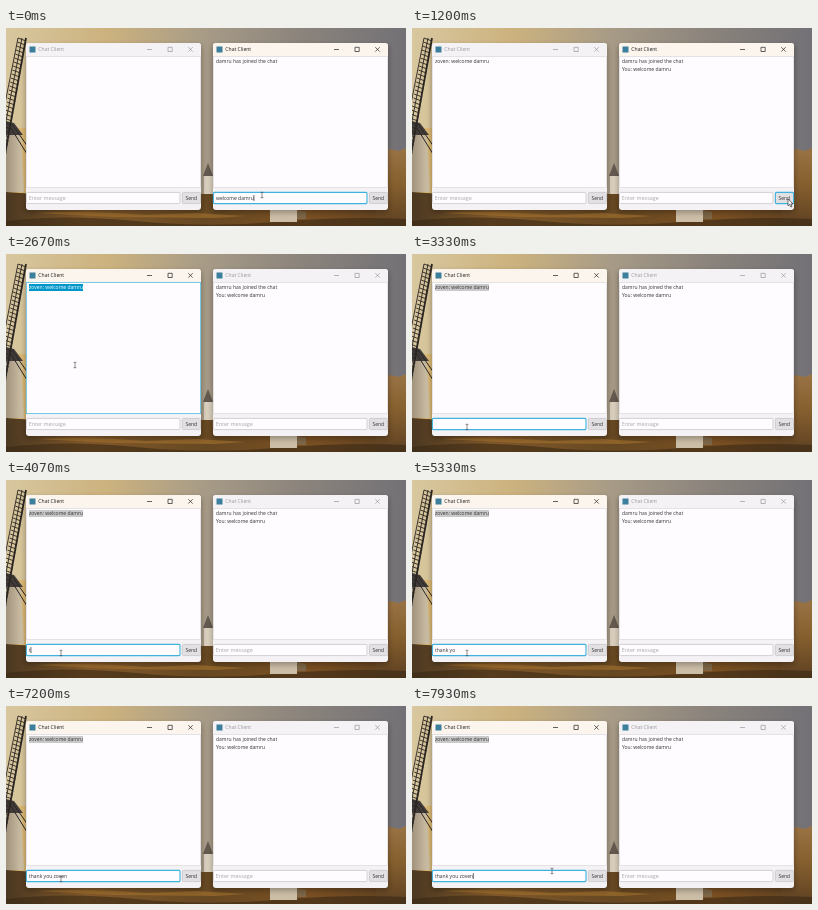
These frames come from a looping animation (400x198 px, 8000 ms). An HTML page:

```html
<!DOCTYPE html>
<html lang="en">
<head>
<meta charset="utf-8">
<title>Chat Client</title>
<style>
  html, body { margin: 0; width: 100%; height: 100%; overflow: hidden; background: #a39680; }
  svg { display: block; width: 100%; height: 100%; }
  text { font: 5px "Open Sans", "Noto Sans", sans-serif; fill: #333; white-space: pre; }
  .title { font-size: 5.1px; fill: #999; }
  .prompt { font-size: 5.4px; fill: #a8a8a8; }
  .bar { fill: #f4f2f5; }
  .controls { fill: none; stroke: #999; stroke-width: .7; }
  .active .title { fill: #1c1c1c; }
  .active .bar { fill: #fcf5ed; }
  .active .controls { stroke: #222; }
  .box { fill: #fefcfe; stroke: #c4c2c4; stroke-width: .7; }
  .area { stroke: #dcdadc; }
  .button { fill: #e2e0e2; }
  .box.focus { stroke: #3fb2de; stroke-width: 1.1; }
  .area.focus { stroke: #62c1e2; stroke-width: .9; }
  .caret { stroke: #111; stroke-width: .6; }
</style>
</head>
<body>
<svg id="stage" viewBox="0 0 400 198" preserveAspectRatio="none">
  <defs>
    <linearGradient id="sky">
      <stop stop-color="#d8c79f"/><stop offset=".25" stop-color="#ccb27e"/>
      <stop offset=".5" stop-color="#a79b87"/><stop offset=".75" stop-color="#8a837c"/>
      <stop offset="1" stop-color="#737176"/>
    </linearGradient>
    <linearGradient id="glow">
      <stop stop-color="#dcb466" stop-opacity=".8"/><stop offset="1" stop-color="#dcb466" stop-opacity="0"/>
    </linearGradient>
    <linearGradient id="land">
      <stop stop-color="#4b3821"/><stop offset=".2" stop-color="#82592a"/>
      <stop offset=".5" stop-color="#664822"/><stop offset=".75" stop-color="#7b5022"/>
      <stop offset="1" stop-color="#5d4022"/>
    </linearGradient>
    <linearGradient id="hill" x2="0" y2="1">
      <stop stop-color="#9a7345"/><stop offset=".45" stop-color="#87602f"/>
      <stop offset="1" stop-color="#5d4022"/>
    </linearGradient>
    <linearGradient id="wall">
      <stop stop-color="#a0927c"/><stop offset="1" stop-color="#d3c5aa"/>
    </linearGradient>
    <filter id="soft" x="-10%" y="-10%" width="120%" height="120%">
      <feGaussianBlur stdDeviation="2.5"/>
    </filter>
  </defs>
  <rect width="400" height="198" fill="url(#sky)"/>
  <rect y="100" width="180" height="70" fill="url(#glow)"/>
  <path d="M0 164L60 168 130 160 195 166 300 166 400 160V198H0Z" fill="url(#land)"/>
  <path d="M370 128L384 121 393 123 400 120V198H370Z" fill="url(#hill)"/>
  <path d="M0 193Q60 186 130 193T270 194 400 191V198H0Z" fill="#3a2914" opacity=".6"/>
  <path d="M30 185Q80 182 140 187L190 185 240 188 210 190 110 189Z" fill="#a87630" opacity=".6"/>
  <path d="M0 106H15L18 164H0Z" fill="url(#wall)"/>
  <path d="M0 93L8 95 17 107H0Z" fill="#413c3a"/>
  <path d="M198 147H207V166H198Z" fill="#dacfbd"/>
  <path d="M197 148L202 135 207 148Z" fill="#655a50"/>
  <path d="M264 178H291V194H264Z" fill="#cbbda6"/>
  <path d="M291 182L300 184V191H291Z" fill="#7d6647"/>
  <g id="sail" fill="none" stroke="#2b2622"/>
  <g id="windows"/>
  <g id="pointer">
    <path id="beam" d="M-1.4-2.7H1.4M-1.4 2.7H1.4M0-2.7V2.7" fill="none" stroke="#444" stroke-width=".6"/>
    <path id="arrow" d="M0 0V6.8L1.6 5.3 2.8 8 4 7.5 2.9 4.9H5Z" fill="#fff" stroke="#111" stroke-width=".6"/>
  </g>
</svg>
<script>
const LOOP = 8000;
const SENT = 900, SWITCHED = 2200, FIELD_FOCUS = 3300;
const GUEST = "damru", HOST = "zoven";
const greeting = `welcome ${GUEST}`;
const reply = `thank you ${HOST}`;
const keyTimes = [3950, 4260, 4430, 4610, 4790, 4960, 5120, 5270, 5560, 5790, 6060, 6310, 6560, 6780, 7000];
const path = [
  [0, 256, 167], [150, 256, 167], [800, 376, 171], [1350, 376, 171],
  [2050, 84, 72], [2500, 69, 111], [2720, 69, 111], [3250, 55, 173],
  [7300, 55, 173], [7900, 140, 165], [LOOP, 140, 165]
];
const $ = id => document.getElementById(id);

function drawSail() {
  let rungs = "";
  for (let i = 0; i <= 30; i++) {
    const x = 19 - i * .7, y = 11 + i * 4;
    rungs += `M${x - 7} ${y - 1}L${x + 1} ${y + 2}`;
  }
  $("sail").innerHTML = `
    <path d="M20 10L-2 132" stroke-width="1.8"/>
    <path d="M12 10L-9 116M16 10L-6 124" stroke-width=".9"/>
    <path d="${rungs}" stroke-width=".9"/>
    <path d="M3 97L21 126M6 96L22 119" stroke-width="1"/>`;
}

function makeWindow(x) {
  const g = document.createElementNS("http://www.w3.org/2000/svg", "g");
  g.setAttribute("transform", `translate(${x})`);
  g.innerHTML = `
    <rect x="19" y="17" width="177" height="168" rx="4" opacity=".25" filter="url(#soft)"/>
    <rect x="20" y="15" width="175" height="167" rx="3" fill="#f4f2f4"/>
    <path class="bar" d="M20 28V18Q20 15 23 15H192Q195 15 195 18V28Z"/>
    <rect x="23.5" y="18.5" width="6" height="6" fill="#3c7f9c"/>
    <text class="title" x="32.3" y="23.3">Chat Client</text>
    <path class="controls" d="M141 21.5H146M162 19.3H166.2V23.5H162ZM182.3 19.2L186.7 23.6M186.7 19.2L182.3 23.6"/>
    <rect class="box area" x="20.4" y="28.4" width="174.2" height="131.2"/>
    <rect class="mark" x="23" y="30" height="7"/>
    <text class="line1" x="23" y="35.4"/><text class="line2" x="23" y="43.4"/>
    <rect class="box field" x="20.4" y="164.4" width="153.6" height="11.2" rx="1"/>
    <text class="prompt" x="22.7" y="172">Enter message</text>
    <text class="typed" x="23" y="171.9"/>
    <path class="caret" d="M0 167V173"/>
    <rect class="box button" x="176.4" y="164.4" width="18.2" height="11.2" rx="1"/>
    <text x="179.4" y="171.9">Send</text>`;
  $("windows").append(g);
  const part = name => g.querySelector("." + name);
  const show = (el, on) => el.setAttribute("visibility", on ? "visible" : "hidden");

  return ({ active, focus, lines, typed = "", blink, mark }) => {
    g.classList.toggle("active", active);
    for (const name of ["area", "field", "button"])
      part(name).classList.toggle("focus", focus === name);
    part("line1").textContent = lines[0] || "";
    part("line2").textContent = lines[1] || "";
    part("typed").textContent = typed;
    show(part("prompt"), !typed && focus !== "field");
    show(part("caret"), focus === "field" && blink);
    const width = el => el.getComputedTextLength();
    part("caret").setAttribute("transform", `translate(${23.2 + (typed ? width(part("typed")) : 0)})`);
    show(part("mark"), !!mark);
    if (mark) {
      part("mark").setAttribute("width", width(part("line1")));
      part("mark").setAttribute("fill", mark);
    }
    part("line1").style.fill = mark && focus === "area" ? "#fff" : "";
  };
}

function pointerAt(t) {
  const i = path.findIndex(p => p[0] > t);
  const [t0, x0, y0] = path[i - 1], [t1, x1, y1] = path[i];
  const u = (t - t0) / (t1 - t0), e = u * u * (3 - 2 * u);
  return [x0 + (x1 - x0) * e, y0 + (y1 - y0) * e];
}

drawSail();
const left = makeWindow(0), right = makeWindow(187);

function render(t) {
  const sent = t >= SENT, switched = t >= SWITCHED, writing = t >= FIELD_FOCUS;
  const blink = (t + 420) % 1000 < 500;
  left({
    active: switched,
    focus: writing ? "field" : switched ? "area" : "",
    lines: sent ? [`${HOST}: ${greeting}`] : [],
    typed: reply.slice(0, keyTimes.filter(k => k <= t).length),
    mark: writing ? "#c9c9c9" : switched ? "#0096c9" : "",
    blink
  });
  right({
    active: !switched,
    focus: switched ? "" : sent ? "button" : "field",
    lines: [`${GUEST} has joined the chat`, sent ? `You: ${greeting}` : ""],
    typed: sent ? "" : greeting,
    blink
  });
  const [x, y] = pointerAt(t);
  const arrow = x > 361 || (x > 195 && x < 207);
  $("pointer").setAttribute("transform", `translate(${x} ${y})`);
  $("arrow").style.display = arrow ? "" : "none";
  $("beam").style.display = arrow ? "none" : "";
}

const start = performance.now();
function tick() {
  render((performance.now() - start) % LOOP);
  requestAnimationFrame(tick);
}
tick();
</script>
</body>
</html>
```
